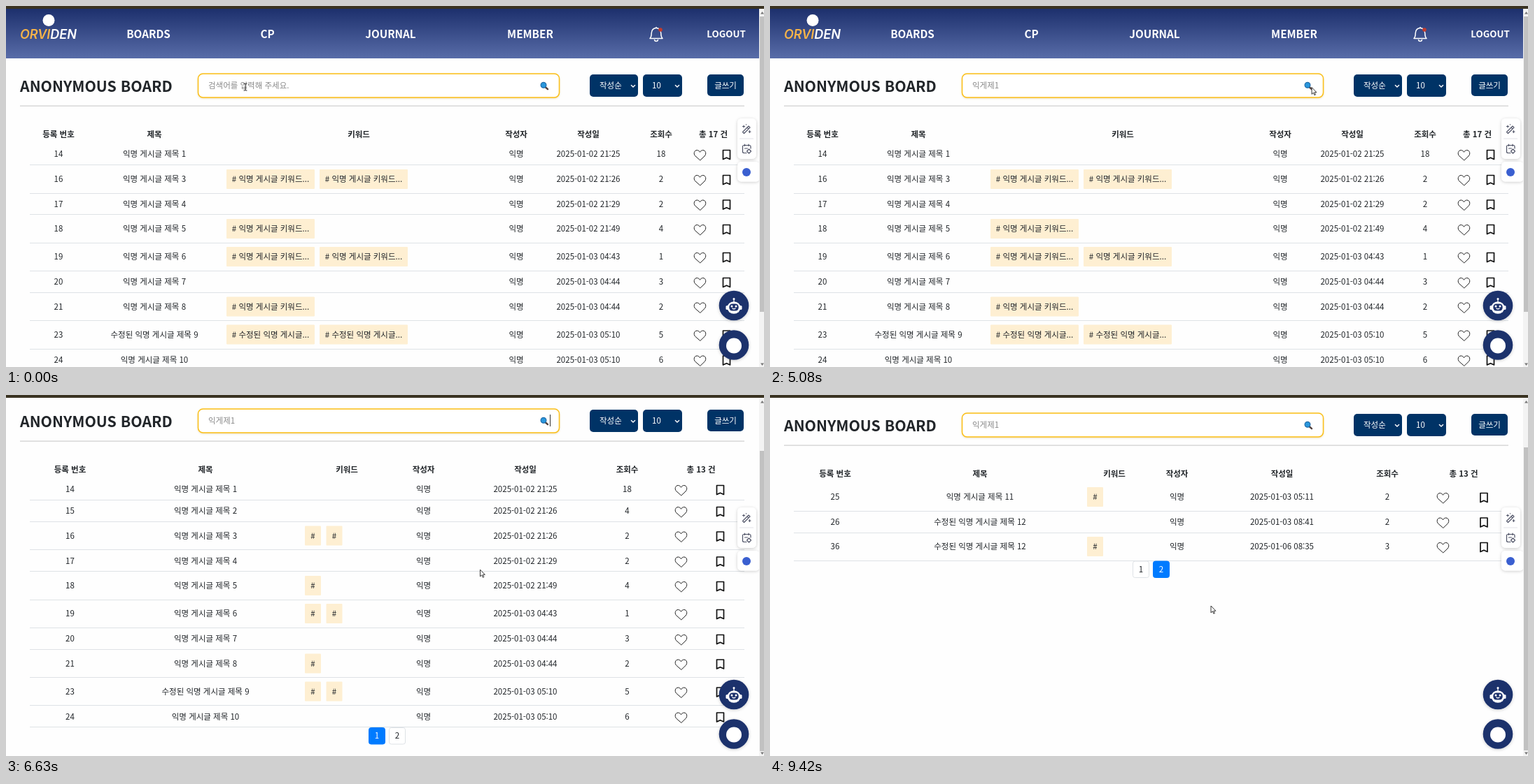
An HTML page that plays this animation: 1083x517 px, repeating every 9950 ms.

```html
<!DOCTYPE html>
<html lang="ko">
<head>
<meta charset="utf-8">
<title>Anonymous board</title>
<style>
html, body { margin: 0; width: 100%; height: 100%; overflow: hidden; background: #fefefe; }
svg { display: block; font: 11.5px "Noto Sans CJK KR", "Noto Sans KR", "Noto Sans CJK", sans-serif; fill: #212529; }
.mid { text-anchor: middle; }
.bold { font-weight: 700; }
.nav { font-weight: 700; font-size: 15.3px; fill: #fff; }
.logo { font: italic 600 18px Inter, sans-serif; fill: #fff; }
.light { fill: #fff; font-weight: 500; }
.gray { fill: #8a8a8a; }
.line { fill: none; stroke-linecap: round; stroke-linejoin: round; }
</style>
</head>
<body>
<svg id="stage" width="1083" height="517" viewBox="0 0 1083 517"></svg>
<script>
const LOOP = 9950;

const rect = (x, y, w, h, fill, extra = '') =>
  `<rect x="${x}" y="${y}" width="${w}" height="${h}" fill="${fill}" ${extra}/>`;
const text = (x, y, str, cls = '', extra = '') =>
  `<text x="${x}" y="${y}" class="${cls}" ${extra}>${str}</text>`;
const line = (d, color, width = 1, extra = '') =>
  `<path class="line" d="${d}" stroke="${color}" stroke-width="${width}" ${extra}/>`;
const dot = (x, y, r, fill) => `<circle cx="${x}" cy="${y}" r="${r}" fill="${fill}"/>`;
const group = (id, body) => `<g id="${id}">${body}</g>`;
const at = (x, y, body) => `<g transform="translate(${x} ${y})">${body}</g>`;

// number, title, day and time, views, keyword count
const posts = [
  [14, '익명 게시글 제목 1', '02 21:25', 18, 0],
  [15, '익명 게시글 제목 2', '02 21:26', 4, 0],
  [16, '익명 게시글 제목 3', '02 21:26', 2, 2],
  [17, '익명 게시글 제목 4', '02 21:29', 2, 0],
  [18, '익명 게시글 제목 5', '02 21:49', 4, 1],
  [19, '익명 게시글 제목 6', '03 04:43', 1, 2],
  [20, '익명 게시글 제목 7', '03 04:44', 3, 0],
  [21, '익명 게시글 제목 8', '03 04:44', 2, 1],
  [23, '수정된 익명 게시글 제목 9', '03 05:10', 5, 2],
  [24, '익명 게시글 제목 10', '03 05:10', 6, 0],
  [25, '익명 게시글 제목 11', '03 05:11', 2, 1],
  [26, '수정된 익명 게시글 제목 12', '03 08:41', 2, 0],
  [36, '수정된 익명 게시글 제목 12', '06 08:35', 3, 1]
];

const heart = line('M0 7.200L-6.800 1.200C-9.800-2-8-7-4.300-7C-2.200-7-.7-5.600 0-4.200C.7-5.600 2.200-7 4.300-7C8-7 9.800-2 6.800 1.200Z', '#222', 1);
const bookmark = line('M-5 6.500v-13h10v13l-5-2.300z', '#111', 1.7);

function keywords(post, y, left, full) {
  const w = full ? 126 : 23, step = full ? 133 : 30.5;
  let out = '';
  for (let i = 0; i < post[4]; i++) {
    const x = left + i * step;
    const label = !full ? '#' : post[0] === 23 ? '# 수정된 익명 게시글...' : '# 익명 게시글 키워드...';
    out += rect(x, y - 14, w, 28, '#feefd2', 'rx="1"') + text(x + w / 2, y + 4, label, 'mid');
  }
  return out;
}

function pager(y, active) {
  return [1, 2].map(n => {
    const on = n === active, x = 518.5 + (n - 1) * 29;
    return rect(x, y - 11.5, 23, 23.5, on ? '#007bff' : '#fff', `rx="3" stroke="${on ? '#007bff' : '#dee2e6'}"`) +
      text(x + 11.5, y + 4, n, 'mid', on ? 'style="fill:#fff"' : '');
  }).join('');
}

// cols: centres of the seven headings, then heart and bookmark
function table(id, list, total, cols, keyLeft, page) {
  const heads = ['등록 번호', '제목', '키워드', '작성자', '작성일', '조회수', `총 ${total} 건`];
  let out = heads.map((h, i) => text(cols[i], 187.6, h, 'mid bold')).join('');
  let top = 196.7;
  for (const post of list) {
    const h = post[4] ? 40.3 : 30.9, y = Math.round((top + h / 2) * 2) / 2;
    const cells = [post[0], post[1], '', '익명', '2025-01-' + post[2], post[3]];
    out += cells.map((c, i) => c === '' ? '' : text(cols[i], y + 4.2, c, 'mid')).join('');
    out += keywords(post, y, keyLeft, !page) + at(cols[7], y + 1.5, heart) + at(cols[8], y + 1, bookmark);
    top += h;
    out += rect(34, Math.round(top - .4), 1021, 1, '#dee2e6');
  }
  if (page) out += pager(top + 12.3, page);
  return group(id, out);
}

const header =
  rect(0, 4, 1076, 71, 'url(#sky)') +
  dot(61, 20.5, 8.5, '#fff') +
  text(20, 46.5, '<tspan fill="#f6b349">ORVI</tspan>DEN', 'logo') +
  [[203.5, 'BOARDS'], [373.5, 'CP'], [549.5, 'JOURNAL'], [749, 'MEMBER']]
    .map(([x, s]) => text(x, 46.3, s, 'nav mid')).join('') +
  text(1029, 45.3, 'LOGOUT', 'nav mid', 'style="font-size:13.3px"') +
  line('M920 46.5c2-2 2.2-4 2.2-7.500c0-10 13.600-10 13.600 0c0 3.500 .2 5.500 2.200 7.500z', '#fff', 1.5) +
  line('M926.500 48.500c.5 2.600 4.500 2.600 5 0M929 31v-.5', '#fff', 1.5) +
  dot(935, 34, 2.8, '#c23a2b');

const button = (x, w, h) => rect(x, 98, w, h, '#003366', 'rx="5"');
const chevron = x => line(`M${x - 2.6} 113.500l2.600 2.600l2.600 -2.600`, '#fff', 1.4);
const toolbar =
  text(20, 122.8, 'ANONYMOUS BOARD', 'bold', 'style="font-size:21.3px"') +
  rect(274.5, 97, 516, 34, '#fff', 'rx="7" stroke="#fbbf14" stroke-width="1.5" filter="url(#glow)"') +
  line('M771 116.500l3 2.700', '#54433f', 2.4) +
  `<circle cx="768" cy="113.300" r="3.900" fill="#2a97dc" stroke="#1f6aa8" stroke-width="1.200"/>` +
  button(834, 69, 32) + text(848, 118, '작성순', 'light') + chevron(896) +
  button(910, 56, 32) + text(923, 118, '10', 'light') + chevron(959) +
  button(1002, 52, 31) + text(1028, 118, '글쓰기', 'light mid') +
  rect(20, 142.500, 1035, 1.200, '#cfcfcf');

const zigzag = 'M289 121.500' + Array.from({ length: 18 }, (_, i) => `l2 ${i % 2 ? 1.600 : -1.600}`).join('');
const field =
  text(289, 118, '', 'gray', 'id="typed"') +
  rect(0, 121, 10.6, .9, '#888', 'id="under"') +
  line(zigzag, '#e33', .9, 'id="wavy"') +
  rect(0, 105, 1, 17, '#555', 'id="caret"') +
  rect(777, 105, 1, 17, '#333', 'id="caret2"') +
  rect(235, 28, 1, 23, '#fff', 'id="caret0"');

const menu = group('menu',
  rect(275.500, 131.500, 514, 105, '#fff', 'rx="6" stroke="#fbbf14" stroke-width="1.300"') +
  [152, 183.200, 214.300].map(y => text(283.5, y, '', 'item')).join(''));

const ink = '#4c5064';
const side =
  rect(1045, 161, 27, 58, '#fff', 'rx="6" filter="url(#soft)"') +
  rect(1048, 189.500, 20, 1, '#e4e4ea') +
  line('M1052.500 180.500l8.500-8.500l2 2l-8.500 8.500zM1059 174l2 2M1054 171v3M1052.500 172.500h3M1062.500 178.500v3M1061 180h3M1057.500 169.500v.5', ink, 1.1) +
  line('M1058 210.500h-3.500q-2 0-2-2v-7q0-2 2-2h7.500q2 0 2 2v2.500M1055.500 198v2.500M1061 198v2.500M1055.500 204h4M1061.500 205l3 3l-3 3l-3-3z', ink, 1.2) +
  rect(1045, 223, 32, 28.500, '#fff', 'rx="6" filter="url(#soft)"') +
  dot(1058, 238, 6, '#3a5fd0');

const navy = '#1c316c';
const disc = `<circle r="21.300" fill="${navy}" filter="url(#soft)"/>`;
const robot = disc +
  line('M0-4v-5', '#fff', 1.200) + dot(0, -9.500, 1.500, '#fff') +
  rect(-11.500, 0, 3, 6, '#fff', 'rx="1.500"') + rect(8.500, 0, 3, 6, '#fff', 'rx="1.500"') +
  `<ellipse cy="3" rx="9.500" ry="8.800" fill="#fff"/>` +
  rect(-6.700, -2.500, 13.400, 10, navy, 'rx="4.500"') +
  dot(-3, 1, 1.500, '#fff') + dot(3, 1, 1.500, '#fff') + line('M-2 4q2 2 4 0', '#fff', 1.200);
const chat = disc + dot(0, 1, 11, '#fff');

const bars =
  rect(1076, 4, 7, 513, '#f3f3f3') + rect(1077, 15, 6, 423, '#c1c1c1', 'id="thumb"') +
  `<path d="M1078 11.500h5l-2.500-3.500zM1078 511.500h5l-2.500 3.500z" fill="#777"/>` +
  rect(0, 0, 1083, 4, '#3a3322');

const cursors =
  group('ibeam', line('M-2-5h1.500l.5.5l.5-.5h1.500M0-4.500v9M-2 5h1.500l.5-.5l.5.5h1.500', '#222', 1)) +
  `<path id="arrow" d="M0 0v9.800l2.300-2.100l1.600 3.500l1.500-.7l-1.600-3.300h3.100z" fill="#fff" stroke="#222" stroke-width=".9"/>` +
  `<path id="hand" d="M-1 1q1-1.800 2 0v4q3-.3 4.800 1.200q.6 1 .1 3.300l-1 3.200h-4.800l-3.300-4.500q0-1.600 1.400-1l.8.800z" fill="#fff" stroke="#222" stroke-width=".9"/>`;

const stage = document.getElementById('stage');
stage.innerHTML = `<defs>
  <linearGradient id="sky" x2="0" y2="1"><stop stop-color="#1d306d"/><stop offset="1" stop-color="#586ca8"/></linearGradient>
  <filter id="glow" x="-5%" y="-30%" width="110%" height="160%"><feDropShadow dx="0" dy="1" stdDeviation="1.200" flood-color="#c9a94a" flood-opacity=".35"/></filter>
  <filter id="soft" x="-30%" y="-30%" width="160%" height="160%"><feDropShadow dx="0" dy="1" stdDeviation="2" flood-opacity=".2"/></filter>
</defs>` +
  rect(0, 0, 1083, 517, '#fefefe') +
  group('page', header + toolbar +
    table('all', posts.filter(p => p[0] < 25 && p[0] !== 15), 17, [75, 212, 504, 729, 832, 936, 1010.5, 991.5, 1029.5], 315) +
    table('found1', posts.slice(0, 10), 13, [91.5, 285, 487, 596.5, 742, 887.5, 993, 964.5, 1020.5], 427, 1) +
    table('found2', posts.slice(10), 13, [93, 300, 492, 581.5, 731.5, 882, 991, 961.5, 1020], 453, 2) +
    menu + field) +
  side + group('bot', robot) + group('talk', chat) + bars + cursors;

const ui = {};
stage.querySelectorAll('[id]').forEach(n => ui[n.id] = n);
const items = stage.querySelectorAll('.item');
const show = (node, on) => node.style.display = on ? '' : 'none';
const move = (node, x, y) => node.setAttribute('transform', `translate(${x} ${y})`);
const ease = p => { p = Math.min(1, Math.max(0, p)); return p * p * (3 - 2 * p); };
const lastBefore = (steps, t) => steps.reduce((a, s) => s[0] <= t ? s : a);
const blink = (t, start, half) => Math.floor((t - start) / half) % 2 === 0;
const hold = t => Math.max(0, 50 + Math.floor((t - 50) / 70) * 70);

const typing = [
  [0, ''], [1200, 'ㅇ'], [1270, '이'], [1340, '익'], [1670, '익ㄱ'],
  [1740, '익게'], [1800, '익겢'], [1870, '익게제'], [2470, '익게제1']
];
const path = [
  [0, 342, 116], [2820, 342, 116], [3560, 813, 104], [3760, 809, 101], [4590, 809, 101],
  [4850, 794, 129], [5080, 770, 114], [5230, 770, 114], [5270, 768, 112], [5500, 768, 112],
  [5850, 683, 239], [6540, 683, 239], [7250, 558, 491], [8500, 558, 491], [9350, 630, 302], [LOOP, 630, 302]
];

function pointer(t) {
  const i = Math.max(1, path.findIndex(k => k[0] > t));
  const [t0, x0, y0] = path[i - 1], [t1, x1, y1] = path[i];
  const p = ease((t - t0) / (t1 - t0));
  return [x0 + (x1 - x0) * p, y0 + (y1 - y0) * p];
}

function drawField(t) {
  const str = lastBefore(typing, t)[1];
  ui.typed.textContent = str || '검색어를 입력해 주세요.';
  let end = 289;
  for (const c of str) end += c === '1' ? 6.4 : 10.58;
  ui.caret.setAttribute('x', Math.round(end - (str.endsWith('1') ? .8 : 0)));
  ui.under.setAttribute('x', end - 10.58);
  show(ui.under, str && t < 2470);
  show(ui.wavy, t >= 2860 && t < 4220);
  show(ui.caret, t >= 650 && t < 4220 && (t < 2470 || blink(t, 2470, 515)));
  show(ui.caret2, t >= 5345 && t < 8480 && blink(t, 5345, 523));
  show(ui.caret0, t >= 70 && t < 580);
  show(ui.menu, t >= 2000 && t < 4220);
  const ends = t < 2600 ? [1, 3, 4] : [11, 1, 10];
  items.forEach((n, i) => n.textContent = '익명 게시글 제목 ' + ends[i]);
}

function draw(t) {
  const view = t < 5550 ? 0 : t < 8520 ? 1 : 2;
  [ui.all, ui.found1, ui.found2].forEach((n, i) => show(n, i === view));
  drawField(t);

  const held = hold(t);
  const p = ease((held - 6330) / 180);
  const scroll = view === 2 ? 71 : 77 * p;
  const lift = Math.sin(Math.PI * p);
  move(ui.page, 0, -scroll);
  move(ui.bot, 1040, 429 - 3 * lift);
  move(ui.talk, 1040, 485.5 - 5 * lift);
  ui.thumb.setAttribute('y', view === 2 ? 75 : 15 + 65 * p);
  ui.thumb.setAttribute('height', [423, 430, 434][view]);

  const [x, y] = pointer(held);
  const kind = x < 791 && t < 3700 ? 'ibeam'
    : (t >= 5280 && t < 5550) || (t >= 7240 && t < 8550) ? 'hand' : 'arrow';
  for (const id of ['ibeam', 'arrow', 'hand']) {
    show(ui[id], id === kind);
    move(ui[id], x, y);
  }
}

const start = performance.now();
function tick() {
  draw((performance.now() - start) % LOOP);
  requestAnimationFrame(tick);
}
tick();
</script>
</body>
</html>
```
